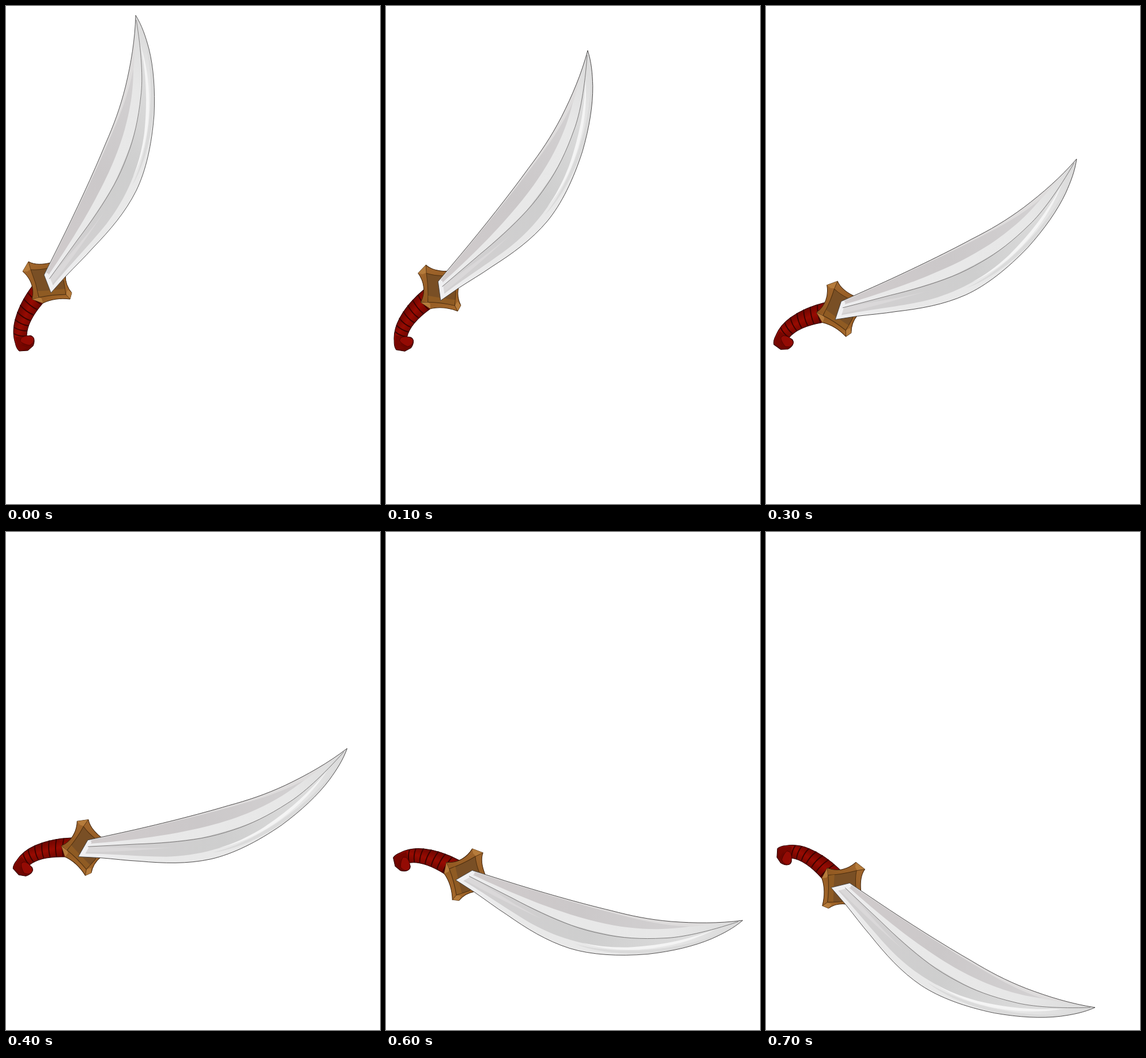
Recreate the animation shown at these times as an HTML page. Size 649x863 px, loop 800 ms.

```html
<!DOCTYPE html>
<html lang="en">
<head>
<meta charset="utf-8">
<title>Swinging sabre</title>
<style>
  html, body { margin: 0; width: 100%; height: 100%; overflow: hidden; background: #fff; }
  svg { display: block; width: 100%; height: 100%; }
</style>
</head>
<body>
<svg viewBox="0 0 649 863">
  <defs>
    <linearGradient id="steel" gradientUnits="userSpaceOnUse" x1="225" y1="16" x2="78" y2="497">
      <stop offset="0" stop-color="#dadada"/>
      <stop offset=".25" stop-color="#e7e7e7"/>
      <stop offset=".8" stop-color="#e9e9e9"/>
      <stop offset="1" stop-color="#efeff1"/>
    </linearGradient>
    <linearGradient id="shade" gradientUnits="userSpaceOnUse" x1="221" y1="110" x2="75" y2="465">
      <stop offset="0" stop-color="#d3d1d2"/>
      <stop offset=".5" stop-color="#cbc8c9"/>
      <stop offset="1" stop-color="#d0cbcc"/>
    </linearGradient>
    <linearGradient id="hollow" gradientUnits="userSpaceOnUse" x1="236" y1="90" x2="85" y2="480">
      <stop offset="0" stop-color="#dedede"/>
      <stop offset=".45" stop-color="#cecece"/>
      <stop offset="1" stop-color="#d2d0d1"/>
    </linearGradient>
    <linearGradient id="leather" gradientUnits="userSpaceOnUse" x1="17" y1="535" x2="47" y2="548">
      <stop offset="0" stop-color="#6b0500"/>
      <stop offset=".5" stop-color="#980b02"/>
      <stop offset="1" stop-color="#6e0600"/>
    </linearGradient>
    <linearGradient id="brass" gradientUnits="userSpaceOnUse" x1="35" y1="448" x2="108" y2="510">
      <stop offset="0" stop-color="#a0662d"/>
      <stop offset=".5" stop-color="#935a22"/>
      <stop offset="1" stop-color="#a4682b"/>
    </linearGradient>
    <path id="edge" d="M225 16C224 58 217 99 207.5 139C198 177 187 206 172.5 239C152 289 120 358 93 412L66 466L78 497L104 468C120 451 136 436 151 419C180 389 207 358 226 320C243 285 253 240 257 188C259 145 256 106 248 74C242 52 236 34 225 16Z"/>
    <clipPath id="inside"><use href="#edge"/></clipPath>
  </defs>
  <g id="sword">
    <g stroke-linejoin="round" stroke-linecap="round">
      <path fill="url(#leather)" stroke="#2c0300" d="M45 486C33 502 22 521 16 543C12 558 12 572 16 584Q18 594 23 598L38 597L47 589C51 580 49 572 42 571L36 572C36 556 45 537 64 515Z"/>
      <path id="wraps" fill="none" stroke="#3a0300" stroke-width="1.9"/>
      <path fill="#780600" d="M16 574L27 573L24 586L37 592L25 597L19 589Z"/>
      <path fill="#940b04" stroke="#4d0400" stroke-width=".8" d="M26 576C30 571 42 570 47 574C50 579 47 585 41 588C34 587 27 584 25 581Z"/>
    </g>
    <g stroke-linejoin="round">
      <path fill="url(#brass)" stroke="#3d210a" d="M39 443C50 449 64 448 77 445L103 467Q103 484 114 497L111 508C95 506 78 508 64 515L45 508C50 490 43 472 29 460Z"/>
      <path fill="#b57b3b" d="M39 443L43 456L37 460L29 460ZM111 508L104 500L107 492L114 497ZM45 508L56 504L62 507L64 515Z"/>
      <path fill="#794f25" stroke="#50300f" d="M43 457Q57 458 74 454L100 476L104 500Q80 500 57 505Q53 481 43 457Z"/>
      <path fill="#8f5b23" d="M55 494Q78 493 102 490L103 499Q80 499 58 504Z"/>
      <path fill="none" stroke="#4e2d0f" stroke-width=".8" d="M39 443L43 457M45 508L57 505M111 508L104 500"/>
    </g>
    <use href="#edge" fill="url(#steel)"/>
    <g clip-path="url(#inside)">
      <path fill="#dedcdc" d="M225 16C224 58 217 99 207 139C197 177 186 206 172 239C151 289 120 358 66 466L74 456C104 396 132 345 158 291C185 228 212 168 222 105Z"/>
      <path fill="url(#shade)" d="M221 108C213 153 196 194 181 228C158 282 128 345 70 462L74 466C100 428 136 372 160 325C182 284 197 246 206 214C215 181 221 150 221 108Z"/>
      <path fill="url(#hollow)" d="M230 60C238 115 237 164 226 207C218 237 207 267 187 309C163 352 117 416 75 473L80 486C105 455 144 415 174 378C208 334 229 285 241 226C249 174 244 113 230 60Z"/>
      <path fill="#dad8d9" d="M75 473L112 429Q142 396 168 360Q122 429 80 482Z"/>
      <path fill="#dbdbdb" d="M226 20C244 54 252 105 251 155C250 207 241 264 219 311C242 273 254 219 257 170C258 105 245 47 226 20Z"/>
      <path fill="#f4f4f4" d="M233 66C243 111 246 163 240 220C236 249 229 276 220 296C237 264 246 225 248 184C250 141 245 103 233 66Z"/>
      <path fill="#f0f0f2" d="M66 466L78 497L84 490L73 463Z"/>
    </g>
    <path fill="none" stroke="#6c6a6a" stroke-width=".8" d="M226 24C235 78 238 126 234 156C230 195 222 230 211 258C204 277 196 295 187 311C170 342 147 375 125 404L75 473"/>
    <use href="#edge" fill="none" stroke="#333131" stroke-width=".8"/>
  </g>
</svg>
<script>
  const STEP = 100;
  const TIP = [225, 16];
  // Each pose: tip x, tip y, rotation in degrees
  const poses = [
    [225, 16, 0], [350, 77, 13.5], [464, 167, 27.6], [539, 265, 39.4],
    [592, 375, 51.1], [626, 518, 65.2], [619, 673, 81], [571, 824, 97.4]
  ];
  const wraps = [
    [38, 497, 61, 517], [31, 508, 54, 526], [25, 519, 47, 535], [20, 531, 42, 545],
    [16, 544, 38, 554], [14, 557, 36, 563], [14, 568, 35, 572]
  ];
  const sword = document.getElementById("sword");

  document.getElementById("wraps").setAttribute("d", wraps.map(([x1, y1, x2, y2]) =>
    `M${x1} ${y1}Q${(x1 + x2) / 2 - 1} ${(y1 + y2) / 2 + 3} ${x2} ${y2}`).join(""));

  function draw(time) {
    const [x, y, angle] = poses[Math.floor(time / STEP) % poses.length];
    sword.setAttribute("transform",
      `translate(${x} ${y}) rotate(${angle}) translate(${-TIP[0]} ${-TIP[1]})`);
  }

  let start;
  function tick(now) {
    start ??= now;
    draw(Math.max(0, now - start));
    requestAnimationFrame(tick);
  }
  draw(0);
  requestAnimationFrame(tick);
</script>
</body>
</html>
```
